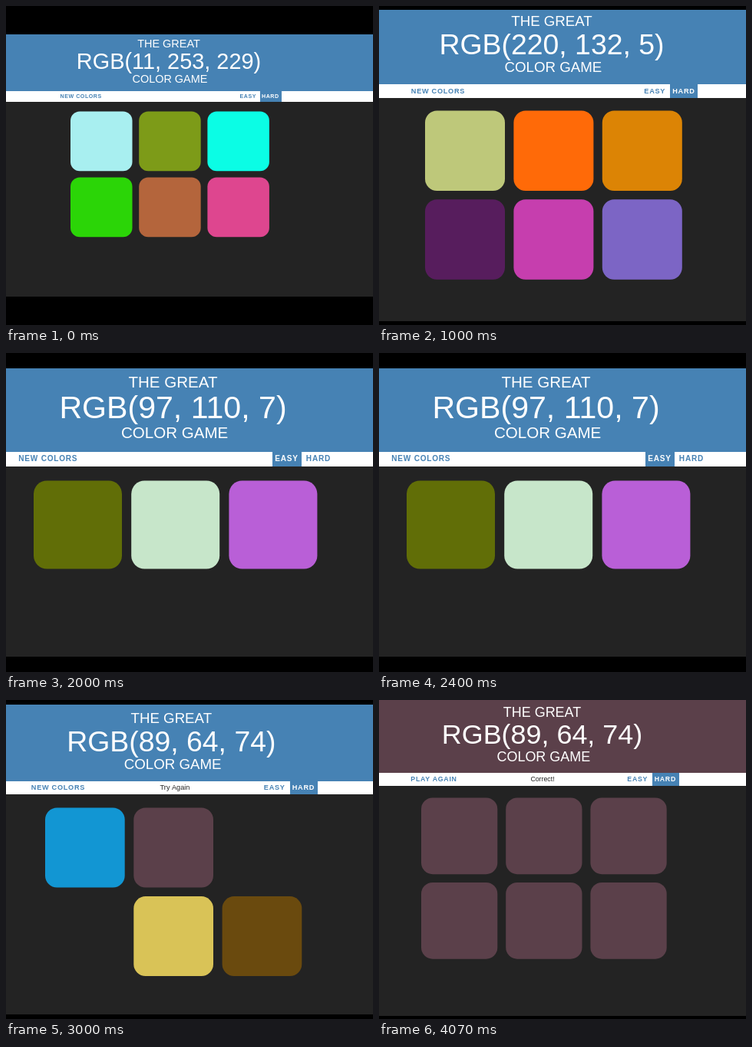
These frames come from a looping animation (478 by 416 pixels, 4990 ms). An HTML page with a canvas:

```html
<!DOCTYPE html>
<html lang="en">
<head>
<meta charset="utf-8">
<title>Color Game</title>
<style>
html, body { margin: 0; width: 478px; height: 416px; overflow: hidden; background: #000; }
canvas { display: block; }
</style>
</head>
<body>
<canvas id="stage" width="478" height="416"></canvas>
<script>
const LOOP = 4990, BLUE = '#4682b4', PLUM = '#5b404a', FONT = '"Liberation Sans", Arial, sans-serif';
const ctx = document.getElementById('stage').getContext('2d');

// s: heading size; top, bar, body, end: edges of the bands; cx: heading centre;
// btn, easy: left edges of the labels; grid: x, y, width, height, pitch x, pitch y
const scenes = [
  { at: 0, s: 14.45, top: 37, bar: 111, body: 125, end: 379, cx: 212, base: 82.3,
    rgb: '11, 253, 229', btn: 71, easy: 305, hard: true, grid: [84, 137.5, 80.5, 77.7, 89.2, 86],
    colors: ['#a8eff0', '#7d9b18', '#0bfde5', '#2bd507', '#b4653c', '#de468f'] },
  { at: 1000, s: 18.7, top: 5, bar: 102, body: 120, end: 411, cx: 225, base: 63.3,
    rgb: '220, 132, 5', btn: 42.5, easy: 346, hard: true, grid: [60, 136.5, 104, 104.5, 115.4, 115.7],
    colors: ['#bec87a', '#ff6a08', '#dc8405', '#571d5d', '#c63eae', '#7c65c5'] },
  { at: 2000, s: 20.55, top: 20, bar: 129, body: 148, end: 396, cx: 217.5, base: 85.2,
    rgb: '97, 110, 7', btn: 17, easy: 351, grid: [36, 166.5, 115, 115, 127.2, 127.2],
    colors: ['#616e07', '#c7e6ca', '#b95fd7'] },
  { at: 3000, s: 18.7, top: 6, bar: 106, body: 123, end: 410, cx: 215.3, base: 67,
    rgb: '89, 64, 74', btn: 33.5, easy: 336.5, hard: true, grid: [51, 140.5, 103.7, 104, 115.3, 115.6],
    msg: 'Try Again', msgX: 220, colors: ['#1296d3', PLUM, null, null, '#d9c357', '#6a4a0e'] },
  { at: 4000, s: 17.95, top: 0, bar: 95, body: 112, end: 412, cx: 212.5, base: 57.4,
    rgb: '89, 64, 74', btn: 42, easy: 324, hard: true, grid: [55, 127.5, 99.3, 99.7, 110.2, 110.5],
    msg: 'Correct!', msgX: 213, label: 'PLAY AGAIN', head: PLUM, colors: Array(6).fill(PLUM) }
];

function band(color, y0, y1, x = 0, w = 478) {
  ctx.fillStyle = color;
  ctx.fillRect(x, y0, w, y1 - y0);
}

function text(str, x, y, size, color, align = 'center', weight = 400, spacing = 0) {
  ctx.font = `${weight} ${size}px ${FONT}`;
  ctx.letterSpacing = spacing + 'px';
  ctx.textAlign = align;
  ctx.fillStyle = color;
  ctx.fillText(str, x, y);
}

function drawBar(c) {
  const { s, bar, body, easy } = c;
  const y = (bar + body) / 2 - 0.5 + 0.169 * s;
  const label = (str, x, on) => {
    if (on) band(BLUE, bar, body, Math.round(x - 0.2 * s), Math.round(s * (str === 'HARD' ? 1.93 : 1.85)));
    text(str, x - 0.035 * s, y, 0.49 * s, on ? '#fff' : BLUE, 'left', 700, 0.038 * s);
  };
  band('#fff', bar, body);
  label(c.label || 'NEW COLORS', c.btn);
  label('EASY', easy, !c.hard);
  label('HARD', easy + 1.975 * s, c.hard);
  if (c.msg) text(c.msg, c.msgX, y, 0.49 * s, '#232323');
}

function drawSquares({ grid: [x, y, w, h, dx, dy], colors }) {
  colors.forEach((color, i) => {
    if (!color) return;
    ctx.fillStyle = color;
    ctx.beginPath();
    ctx.roundRect(x + i % 3 * dx, y + Math.floor(i / 3) * dy, w, h, 0.15 * w);
    ctx.fill();
  });
}

function draw(c) {
  const { s, cx, base } = c;
  band('#000', 0, 416);
  band('#232323', c.body, c.end);
  band(c.head || BLUE, c.top, c.bar);
  text('THE GREAT', cx, base - 1.98 * s, s, '#fff');
  text(`RGB(${c.rgb})`, cx, base, 2 * s, '#fff');
  text('COLOR GAME', cx + 0.1 * s, base + 1.24 * s, s, '#fff');
  drawBar(c);
  drawSquares(c);
}

const start = performance.now();
function tick() {
  const t = (performance.now() - start) % LOOP;
  draw(scenes.findLast(c => c.at <= t));
  requestAnimationFrame(tick);
}
tick();
</script>
</body>
</html>
```
